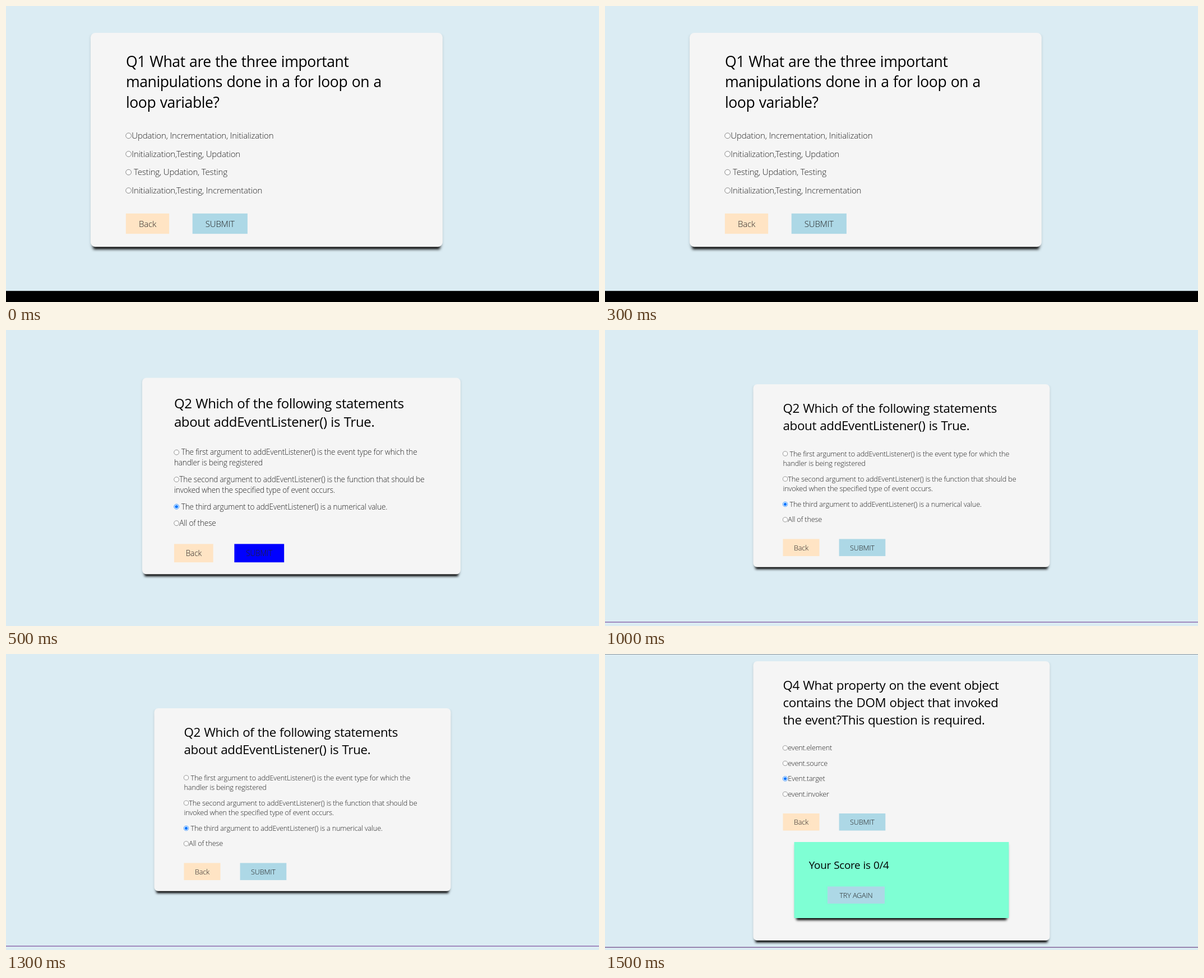
Animation of 1058x529 px, one loop 2 s. Source, as an HTML page:

```html
<!DOCTYPE html>
<html lang="en">
<head>
<meta charset="utf-8">
<title>Quiz</title>
<style>
  html, body { margin: 0; height: 100%; overflow: hidden; background: #dbecf3; }
  svg { display: block; }
  text { font-family: "Open Sans", "Noto Sans", sans-serif; white-space: pre; }
  .title { font-size: 22.4px; letter-spacing: -.0165em; word-spacing: .035em; }
  .score { font-size: 18.9px; letter-spacing: -.0165em; word-spacing: .035em; }
  .label { font-size: 12.7px; font-weight: 300; letter-spacing: -.013em; fill: #222; }
  .middle { text-anchor: middle; }
  .soft { filter: blur(2.2px); }
</style>
</head>
<body>
<svg id="stage" width="1058" height="529" viewBox="0 0 1058 529"></svg>
<script>
const rect = (x, y, w, h, fill, extra = '') =>
  `<rect x="${x}" y="${y}" width="${w}" height="${h}" fill="${fill}" ${extra}/>`;
const text = (x, y, kind, content) =>
  `<text x="${x}" y="${y}" class="${kind}">${content}</text>`;

const button = (x, y, w, fill, caption) =>
  rect(x, y, w, 30.6, fill) + text(x + w / 2, y + 20.3, 'label middle', caption);

// Raised panel: faint glow at the sides, dark shadow under the lower edge
const panel = (x, y, w, h, fill, radius) =>
  rect(x, y + 4, w, h - 4, '#000', 'class="soft" opacity=".12"') +
  rect(x + 4, y + 12, w - 8, h - 8.5, '#000', 'class="soft"') +
  rect(x, y, w, h, fill, `rx="${radius}"`);

const radio = (y, on) =>
  `<circle cx="57" cy="${y}" r="4.1" fill="#fff" stroke="${on ? '#0075ff' : '#767676'}" stroke-width=".75"/>` +
  (on ? `<circle cx="57" cy="${y}" r="2.6" fill="#0075ff"/>` : '');

function card({ x, y, scale, title, options, picked, submit = '#add8e6', score, extra = '' }) {
  let body = title.map((line, i) => text(53, 51 + 30.85 * i, 'title', line)).join('');
  let row = 62.3 + 30.85 * title.length;
  options.forEach((option, i) => {
    const [first, second] = option.split('|');
    body += radio(row, i === picked) + text(61.8, row + 4.5, 'label', first);
    if (second) {
      row += 17.7;
      body += text(53, row + 4.5, 'label', second);
    }
    row += 27.5;
  });
  const top = row + 7.1;
  body += button(53, top, 65, '#ffe4c4', 'Back') + button(153.1, top, 82.7, submit, 'SUBMIT');
  if (score) {
    body += panel(73, 323, 383, 136, '#7fffd4', 0) +
      text(99.3, 370.5, 'score', score) +
      button(132.5, 402.5, 102, '#add8e6', 'TRY AGAIN');
  }
  const height = score ? 499 : top + 50.3;
  return `<g visibility="hidden">${extra}<g transform="translate(${x} ${y}) scale(${scale})">` +
    panel(0, 0, 529, height, '#f5f5f5', 7) + body + '</g></g>';
}

const listener = {
  title: ['Q2 Which of the following statements', 'about addEventListener() is True.'],
  options: [
    ' The first argument to addEventListener() is the event type for which the|handler is being registered',
    'The second argument to addEventListener() is the function that should be|invoked when the specified type of event occurs.',
    ' The third argument to addEventListener() is a numerical value.',
    'All of these'
  ],
  picked: 2
};

const scenes = [
  {
    x: 151, y: 48, scale: 1.187,
    title: ['Q1 What are the three important', 'manipulations done in a for loop on a', 'loop variable?'],
    options: [
      'Updation, Incrementation, Initialization',
      'Initialization,Testing, Updation',
      ' Testing, Updation, Testing',
      'Initialization,Testing, Incrementation'
    ],
    extra: rect(0, 509.2, 1058, 19.8, '#000')
  },
  { ...listener, x: 243, y: 85.5, scale: 1.0737, submit: '#00f' },
  { ...listener, x: 264.5, y: 97, scale: 1, extra: rect(0, 521.5, 1058, 1.2, '#7b4a9c') },
  {
    x: 264.5, y: 13, scale: 1,
    title: ['Q4 What property on the event object', 'contains the DOM object that invoked', 'the event?This question is required.'],
    options: ['event.element', 'event.source', 'Event.target', 'event.invoker'],
    picked: 2,
    score: 'Your Score is 0/4',
    extra: rect(0, 0, 1058, 1, '#8b959b') + rect(0, 523.6, 1058, 1.2, '#6b4585')
  }
];

const stage = document.getElementById('stage');
stage.innerHTML = scenes.map(card).join('');
const groups = [...stage.children];

function draw() {
  const current = Math.floor(performance.now() / 500) % groups.length;
  groups.forEach((group, i) => group.setAttribute('visibility', i === current ? 'visible' : 'hidden'));
  requestAnimationFrame(draw);
}
draw();
</script>
</body>
</html>
```
